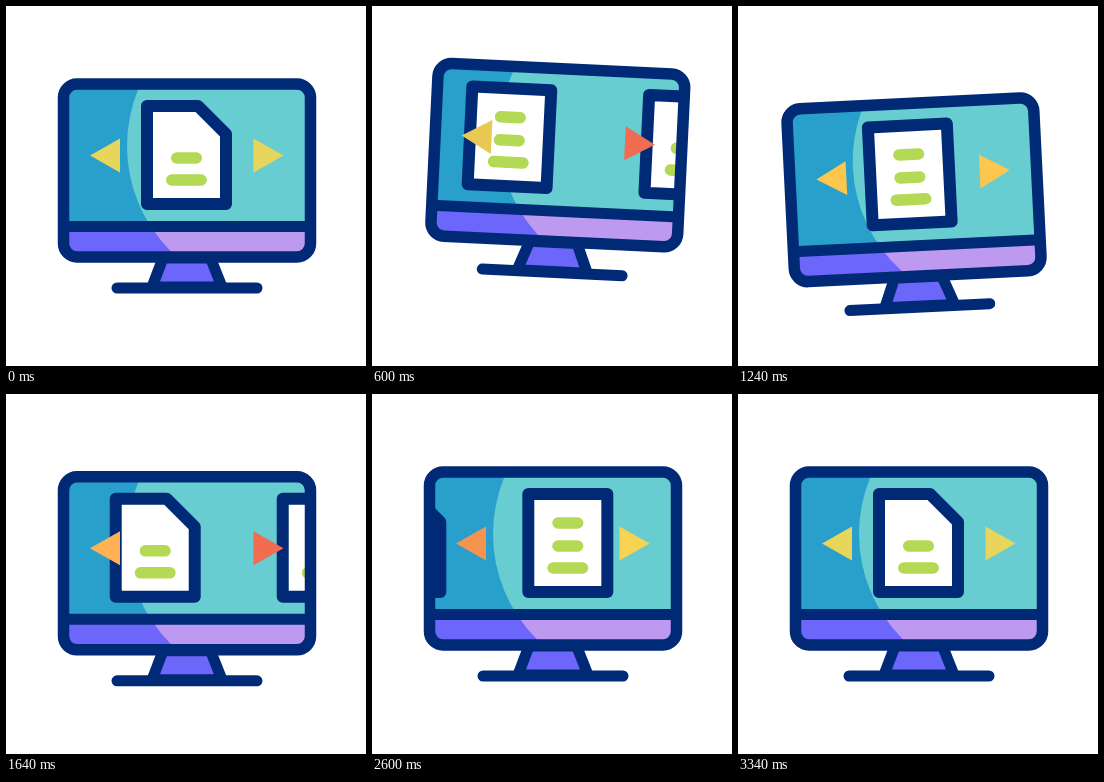
Write an HTML page with a canvas that moves like this. It is 360 px wide and 360 px high and loops after 3.6 s.

```html
<!DOCTYPE html>
<html lang="en">
<head>
<meta charset="utf-8">
<title>Slider on a monitor</title>
<style>
html, body { margin: 0; width: 100%; height: 100%; overflow: hidden; background: #fff; }
canvas { display: block; width: 360px; height: 360px; }
</style>
</head>
<body>
<canvas id="stage" width="360" height="360"></canvas>
<script>
const ctx = document.getElementById('stage').getContext('2d');
const LOOP = 3600;
const NAVY = '#002a76', WHITE = '#fff', GREEN = '#b3d955';
const BLUE = '#299fcc', TEAL = '#67cdd0', VIOLET = '#6c66fa', LILAC = '#bd9af0';
const PIVOT = { x: 180.5, y: 265 };

// Tracks are lists of [time, value]; arrow values are RGB colours.
const LIFT = [[180, 0], [500, -18], [1120, 20.4], [1890, 0]];
const TILT = [[180, 0], [660, 2.85], [1220, -2.85], [1620, 0]];
const SLIDE = [[190, 0], [815, 174], [1250, 174], [1805, 347.5],
  [2380, 347.5], [2660, 174], [2990, 174], [3330, 0]];

const DULL = [231, 213, 92], AMBER = [252, 198, 79], RED = [241, 108, 80];
const LEFT_TINT = [[200, DULL], [600, [232, 201, 82]], [1240, AMBER],
  [1640, [255, 177, 84]], [1950, DULL], [2380, DULL], [2500, RED],
  [2720, AMBER], [2860, AMBER], [3080, RED], [3330, DULL]];
const RIGHT_TINT = [[200, DULL], [420, RED], [620, RED], [860, AMBER],
  [1250, AMBER], [1460, RED], [1650, RED], [1950, DULL], [2380, DULL],
  [2600, [248, 210, 80]], [3330, DULL]];

const ease = u => (1 - Math.cos(Math.PI * u)) / 2;
const mix = (a, b, k) => a + (b - a) * k;

function at(track, t) {
  if (t <= track[0][0]) return track[0][1];
  for (let i = 1; i < track.length; i++) {
    const [t0, a] = track[i - 1], [t1, b] = track[i];
    if (t < t1) {
      const k = ease((t - t0) / (t1 - t0));
      return Array.isArray(a) ? a.map((v, j) => mix(v, b[j], k)) : mix(a, b, k);
    }
  }
  return track[track.length - 1][1];
}

function trace(points, closed) {
  ctx.beginPath();
  points.forEach(([x, y]) => ctx.lineTo(x, y));
  if (closed) ctx.closePath();
}

function line(x0, y0, x1, y1, color, width) {
  trace([[x0, y0], [x1, y1]]);
  ctx.strokeStyle = color;
  ctx.lineWidth = width;
  ctx.stroke();
}

function outline(fill, width) {
  ctx.fillStyle = fill;
  ctx.fill();
  ctx.strokeStyle = NAVY;
  ctx.lineWidth = width;
  ctx.stroke();
}

function bodyPath() {
  ctx.beginPath();
  ctx.roundRect(57.5, 78, 247, 173, 13.5);
}

function page(x, folded) {
  const l = x - 39.5, r = x + 39.5;
  const corner = folded ? [[x + 11.5, 100], [r, 128]] : [[r, 100]];
  trace([[l, 100], ...corner, [r, 198], [l, 198]], true);
  outline(WHITE, 12);
  const rows = folded ? [152, 174] : [129, 152, 174];
  for (const y of rows) {
    const half = y === 174 ? 14.7 : 9.8;
    line(x - half, y, x + half, y, GREEN, 11.5);
  }
}

function arrow(base, tip, color) {
  trace([[base, 132.5], [base, 166.5], [tip, 149.5]], true);
  ctx.fillStyle = 'rgb(' + color.map(Math.round).join(',') + ')';
  ctx.fill();
}

function backdrop(dark, light, y, h) {
  ctx.save();
  ctx.beginPath();
  ctx.rect(50, y, 265, h);
  ctx.clip();
  ctx.fillStyle = dark;
  ctx.fillRect(50, y, 265, h);
  ctx.beginPath();
  ctx.arc(269, 140, 148, 0, Math.PI * 2);
  ctx.fillStyle = light;
  ctx.fill();
  ctx.restore();
}

function draw(t) {
  ctx.fillStyle = WHITE;
  ctx.fillRect(0, 0, 360, 360);
  ctx.save();
  ctx.lineCap = ctx.lineJoin = 'round';
  ctx.translate(PIVOT.x, PIVOT.y + at(LIFT, t));
  ctx.rotate(at(TILT, t) * Math.PI / 180);
  ctx.translate(-PIVOT.x, -PIVOT.y);

  // stand
  trace([[157, 252], [204.5, 252], [216, 281], [146, 281]], true);
  outline(VIOLET, 11);
  line(111, 282, 251, 282, NAVY, 11);

  // screen contents
  ctx.save();
  bodyPath();
  ctx.clip();
  backdrop(BLUE, TEAL, 72, 148);
  backdrop(VIOLET, LILAC, 220, 40);
  const shift = at(SLIDE, t);
  page(180.5 + shift, true);
  page(3.5 + shift, false);
  page(-163.5 + shift, true);
  arrow(114, 84, at(LEFT_TINT, t));
  arrow(247.5, 277.5, at(RIGHT_TINT, t));
  ctx.restore();

  // frame
  line(58, 220.5, 304, 220.5, NAVY, 11);
  bodyPath();
  ctx.lineWidth = 11.5;
  ctx.stroke();
  ctx.restore();
}

const start = performance.now();
function tick() {
  draw((performance.now() - start) % LOOP);
  requestAnimationFrame(tick);
}
tick();
</script>
</body>
</html>
```
